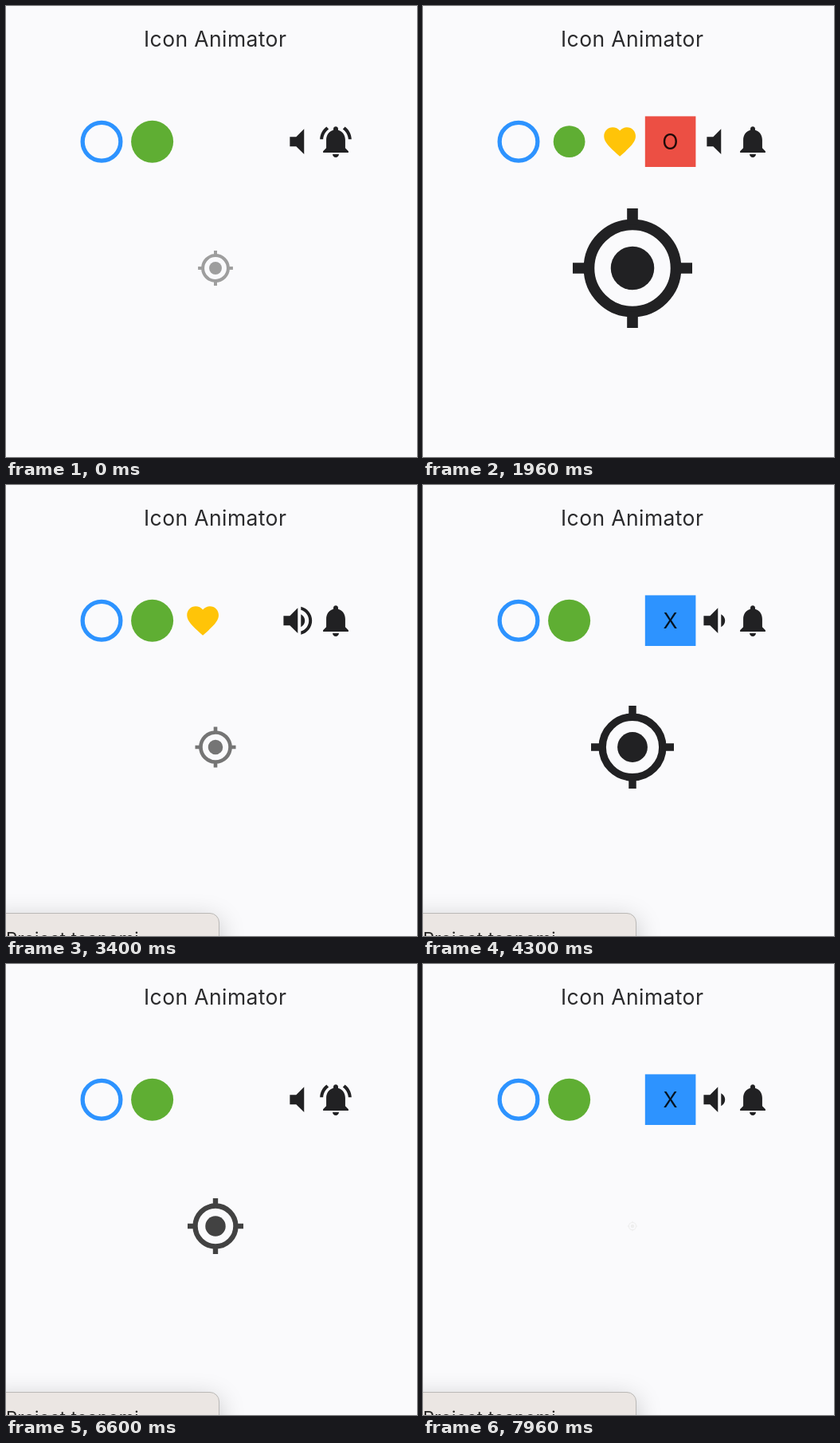
An HTML page that plays this animation: 516 by 566 pixels, repeating every 8 s.

```html
<!DOCTYPE html>
<html lang="en">
<head>
<meta charset="utf-8">
<title>Icon Animator</title>
<style>
html, body { margin: 0; width: 100%; height: 100%; overflow: hidden; background: #fafafc; }
body { position: relative; font-family: Inter, Roboto, sans-serif; }
svg { position: absolute; left: 0; top: 0; }
text { font-size: 26.5px; text-anchor: middle; fill: #2a2a2c; letter-spacing: .4px; }
#panel {
  position: absolute; left: -30px; top: 537px; width: 298px; height: 90px;
  box-sizing: border-box; padding: 15px 0 0 29px; border: 1px solid #bab8b6; border-radius: 12px;
  background: #ebe6e3; box-shadow: 0 8px 32px rgba(0, 0, 0, .22);
  font-size: 22px; line-height: 32px; letter-spacing: .3px; color: #262524; white-space: nowrap;
}
</style>
</head>
<body>
<svg width="516" height="566" viewBox="0 0 516 566">
  <text x="262.7" y="51.2">Icon Animator</text>
  <circle id="ring" r="9" fill="none" stroke="#2d93ff" stroke-width="2"/>
  <circle id="disc" r="10" fill="#5fae33"/>
  <path id="heart" d="M12 21.35l-1.45-1.32C5.4 15.36 2 12.28 2 8.5 2 5.42 4.42 3 7.5 3c1.74 0 3.41.81 4.5 2.09C13.09 3.81 14.76 3 16.5 3 19.58 3 22 5.42 22 8.5c0 3.78-3.4 6.86-8.55 11.54z"/>
  <g id="tile">
    <rect x="278.8" y="138.4" width="63.6" height="63.6"/>
    <text id="letter" x="310.7" y="179.7" style="fill:rgba(0,0,0,.87)"></text>
  </g>
  <path id="speaker" fill="#212123"/>
  <path id="bell" fill="#212123"/>
  <g id="target">
    <circle r="4"/>
    <circle r="8" fill="none" stroke="currentColor" stroke-width="2"/>
    <path d="M-1-11h2v3h-2zM-1 8h2v3h-2zM-11-1h3v2h-3zM8-1h3v2h-3z"/>
  </g>
</svg>
<div id="panel">Project teanomi</div>
<script>
const $ = id => document.getElementById(id);
const ROW = 170.2, UNIT = 63.6 / 24 / 48;   // pixels per icon unit, per size point

const SPEAKER = [
  'M7 9v6h4l5 5V4l-5 5H7z',
  'M18.5 12c0-1.77-1.02-3.29-2.5-4.03v8.05c1.48-.73 2.5-2.25 2.5-4.02zM5 9v6h4l5 5V4L9 9H5z',
  'M3 9v6h4l5 5V4L7 9H3zm13.5 3c0-1.77-1.02-3.29-2.5-4.03v8.05c1.48-.73 2.5-2.25 2.5-4.02zM14 3.23v2.06c2.89.86 5 3.54 5 6.71s-2.11 5.85-5 6.71v2.06c4.01-.91 7-4.49 7-8.77s-2.99-7.86-7-8.77z'
];
const BELL = 'M12 22c1.1 0 2-.9 2-2h-4c0 1.1.89 2 2 2zm6-6v-5c0-3.07-1.64-5.64-4.5-6.32V4c0-.83-.67-1.5-1.5-1.5s-1.5.67-1.5 1.5v.68C7.63 5.36 6 7.92 6 11v5l-2 2v1h16v-1l-2-2z';
const WAVES = 'M7.58 4.08L6.15 2.65C3.75 4.48 2.17 7.3 2.03 10.5h2c.15-2.65 1.51-4.97 3.55-6.42zm12.39 6.42h2c-.15-3.2-1.73-6.02-4.12-7.85l-1.42 1.43c2.02 1.45 3.39 3.77 3.54 6.42z';

// [half extent in pixels, colour]
const TARGET = [
  [21.9, '#9e9e9e'], [25.5, '#757575'], [29.15, '#616161'], [35, '#424242'],
  [52, '#212123'], [75, '#212123'], [117, '#212123'], [0, 'none'], [6.3, '#eeeeee']
];
// [size, colour]
const HEART = [[0, 'none'], [48, '#ffa808'], [36, '#ffc408']];

const mod = (a, n) => (a % n + n) % n;
const between = (t, a, b) => t >= a && t < b;

function place(id, x, size, centre = 0) {
  $(id).setAttribute('transform', `translate(${x} ${ROW}) scale(${size * UNIT}) translate(${-centre} ${-centre})`);
}

function draw(time) {
  // the opening runs a little slower
  const t = time < 900 ? 370 + time * .6 : time;

  place('ring', 120, between(t, 820, 1400) ? 42 : 48);
  place('disc', 183.6, between(t, 1700, 2300) ? 36 : 48);

  const beat = Math.floor((t - 910) / 550) + 1;
  const [size, colour] = HEART[beat < 6 ? mod(beat, 3) : 0];
  place('heart', 247.1, size, 12);
  $('heart').setAttribute('fill', colour);

  const turn = mod(t - 1680, 1810), red = turn < 445;
  $('tile').style.display = t >= 1680 && turn < 890 ? '' : 'none';
  $('tile').setAttribute('fill', red ? '#ec4f44' : '#2d93ff');
  $('letter').textContent = red ? 'O' : 'X';

  const tick = Math.floor((t - 57) / 103.85);
  $('speaker').setAttribute('d', SPEAKER[mod(tick, 3)]);
  $('bell').setAttribute('d', BELL + (mod(tick, 2) ? WAVES : ''));

  const [half, shade] = TARGET[Math.floor(mod(t - 330, 2610) / 290)];
  const target = $('target');
  target.setAttribute('transform', `translate(263 329) scale(${half / 11})`);
  target.setAttribute('fill', shade);
  target.style.color = shade;
  target.style.display = half ? '' : 'none';

  $('panel').style.display = t >= 2300 ? '' : 'none';
}

place('speaker', 366.3, 36, 12);
place('bell', 414, 36, 12);

const start = performance.now();
(function loop() {
  draw((performance.now() - start) % 8000);
  requestAnimationFrame(loop);
})();
</script>
</body>
</html>
```
